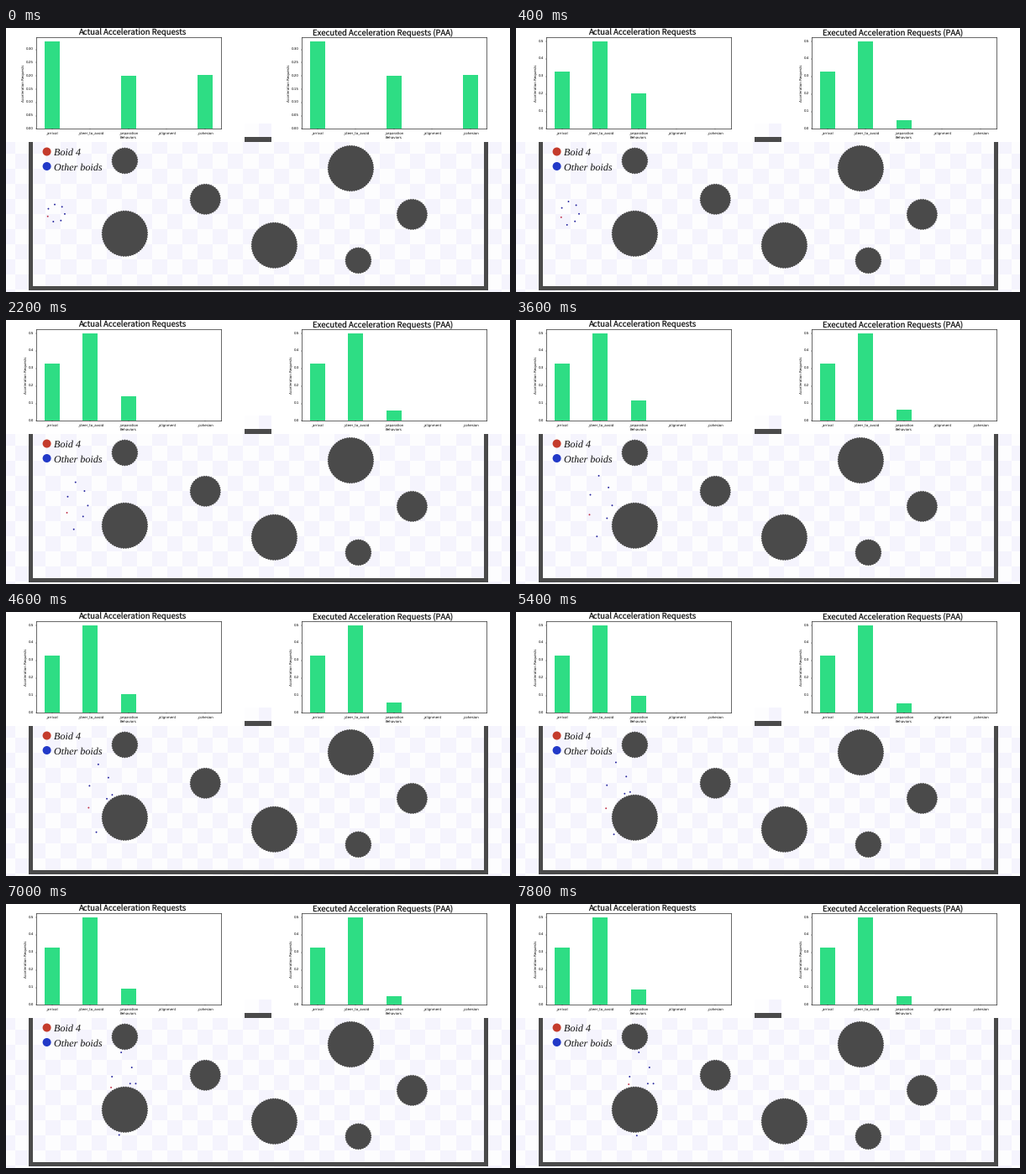
A matplotlib script for the animation above (8000 ms loop, 600 px wide and 315 px high).

```python
import numpy as np
import matplotlib.pyplot as plt
from matplotlib.animation import FuncAnimation
from matplotlib.patches import Circle, Polygon, Rectangle

W, H, DPI = 600, 315, 100
FRAMES, STEP = 40, 200
PX = 72 / DPI          # points per pixel
CHART_PT = 0.2844      # shrink factor of the bar charts

DARK, GREEN, RED, BLUE = "#4a4a4a", "#2edd84", "#c43b2c", "#2239c8"
FLOOR, TILE = "#fdfdfe", "#f5f4fd"

plt.rcParams.update({
    "font.family": "DejaVu Sans",
    "font.size": 10 * CHART_PT,
    "axes.linewidth": 0.42,
    "axes.labelpad": 4 * CHART_PT,
    "text.hinting": "none",
})
for axis in ("xtick", "ytick"):
    plt.rcParams.update({
        f"{axis}.major.size": 3.5 * CHART_PT,
        f"{axis}.major.width": 0.3,
        f"{axis}.major.pad": 3.5 * CHART_PT,
    })

fig = plt.figure(figsize=(W / DPI, H / DPI), dpi=DPI, facecolor="white")
stage = fig.add_axes([0, 0, 1, 1])
stage.set(xlim=(0, W), ylim=(H, 0))
stage.axis("off")


def rect(x0, y0, x1, y1, color, z):
    stage.add_patch(Rectangle((x0, y0), x1 - x0, y1 - y0, fc=color, lw=0, zorder=z))


def disc(x, y, r, color, z):
    dot = Circle((x, y), r, fc=color, lw=0, zorder=z)
    stage.add_patch(dot)
    return dot


def rough_disc(x, y, r):
    """Obstacle with a finely toothed rim."""
    n = int(r * 2.2) * 2
    a = np.arange(n) * 2 * np.pi / n
    rr = r + 0.5 * np.where(np.arange(n) % 2, 1, -1)
    rim = np.column_stack([x + rr * np.cos(a), y + rr * np.sin(a)])
    stage.add_patch(Polygon(rim, fc=DARK, lw=0, zorder=3))


# Arena floor and walls
LEFT, RIGHT, TOP, BOTTOM, WALL = 26.7, 574.3, 130, 313.3, 5.2
CX, CY = (LEFT + RIGHT) / 2, (TOP + BOTTOM) / 2 + 0.4
CELL = (RIGHT - LEFT - WALL) / 30
rect(0, CY - 6 * CELL, W, H, FLOOR, 0)
for i in range(-17, 17):
    for j in range(-6, 6):
        if (i + j) % 2 == 0:
            x, y = CX + i * CELL, CY + j * CELL
            rect(x, y, x + CELL, y + CELL, TILE, 1)

rect(LEFT, TOP, RIGHT, TOP + WALL + 0.3, DARK, 2)
rect(LEFT, BOTTOM - WALL, RIGHT, BOTTOM, DARK, 2)
rect(LEFT, TOP, LEFT + WALL, BOTTOM, DARK, 2)
rect(RIGHT - WALL, TOP, RIGHT, BOTTOM, DARK, 2)

BIG = (141.4, 245.3)   # the obstacle the flock meets
for x, y, r in [(*BIG, 27.3), (141.4, 158.4, 15.5), (237.3, 204.3, 18.2),
                (319.4, 259.3, 27.3), (410.4, 167.5, 27.3),
                (483.4, 222.4, 18.2), (419.4, 277.4, 15.5)]:
    rough_disc(x, y, r)

# Legend
for y, color, label in [(147.5, RED, "Boid 4"), (165, BLUE, "Other boids")]:
    disc(48.6, y, 5, color, 4)
    stage.text(57, y + 4.4, label, family="Liberation Serif", style="italic",
               size=12.1 * PX, color="#111111", va="baseline")

# Charts
NAMES = ["_arrival", "_steer_to_avoid", "_separation", "_alignment", "_cohesion"]


def chart(x0, title, title_x):
    rect(x0, 0, x0 + 284, 135.5, "white", 5)
    stage.text(title_x, 9, title, family="Noto Sans CJK JP", size=9.5 * PX,
               color="#1c1c1c", ha="center", va="baseline", zorder=6)
    ax = fig.add_axes([(x0 + 35.6) / W, 1 - 120.4 / H, 220.2 / W, 109.6 / H])
    bars = ax.bar(range(5), np.zeros(5), 0.4, color=GREEN)
    ax.set_xticks(range(5), NAMES)
    ax.set_xlim(-0.42, 4.42)
    ax.set_xlabel("Behaviors")
    ax.set_ylabel("Acceleration Requests")
    return ax, bars


charts = [chart(0, "Actual Acceleration Requests", 150.7),
          chart(316, "Executed Acceleration Requests (PAA)", 449)]

# The flock starts as a ring, drifts right and fans out into lanes
LANES = np.array([235, 206, 177, 195, 221, 239, 268])
ANGLES = np.radians(-201) + np.arange(7) * 2 * np.pi / 7
START, RING, SPEED, FAN_TIME, CLEARANCE = (59.5, 221), 10.5, 11.4, 7.4, 31

boids = [disc(0, 0, 0.95, "#c03048" if k == 0 else "#22229c", 4)
         for k in range(len(LANES))]


def flock(t):
    fan = 1 - max(0, 1 - t / FAN_TIME) ** 2
    x = START[0] + SPEED * t + RING * np.cos(ANGLES) * (1 + 0.45 * fan)
    y0 = START[1] + RING * np.sin(ANGLES)
    y = y0 + (LANES - y0) * fan
    # slide over or under the big obstacle, and keep that height once past it
    dx = np.minimum(x - BIG[0], 0)
    gap = np.sqrt(np.maximum(CLEARANCE ** 2 - dx ** 2, 0))
    blocked = gap > 0
    above = np.minimum(y, BIG[1] - gap)
    below = np.maximum(y, BIG[1] + gap)
    return x, np.where(blocked, np.where(LANES < BIG[1], above, below), y)


def requests(t):
    """Bar heights of the actual and the executed chart."""
    if t == 0:
        calm = [0.33, 0, 0.2, 0, 0.205]
        return calm, calm
    actual = 0.085 + 0.142 * np.exp(-t / 2.4)
    executed = 0.05 + 0.013 * max(0, np.sin(np.pi * (t - 0.4) / 5.6))
    return [[0.33, 0.5, sep, 0, 0] for sep in (actual, executed)]


def update(frame):
    t = frame * STEP / 1000
    for dot, x, y in zip(boids, *flock(t)):
        dot.center = x, y
    for (ax, bars), values in zip(charts, requests(t)):
        for bar, v in zip(bars, values):
            bar.set_height(v)
        top = max(values) * 1.05
        ax.set_yticks(np.arange(0, top, 0.05 if top < 0.4 else 0.1))
        ax.set_ylim(0, top)
    return []


anim = FuncAnimation(fig, update, frames=FRAMES, interval=STEP,
                     init_func=lambda: update(0), repeat=True, repeat_delay=0)
plt.show()
```
